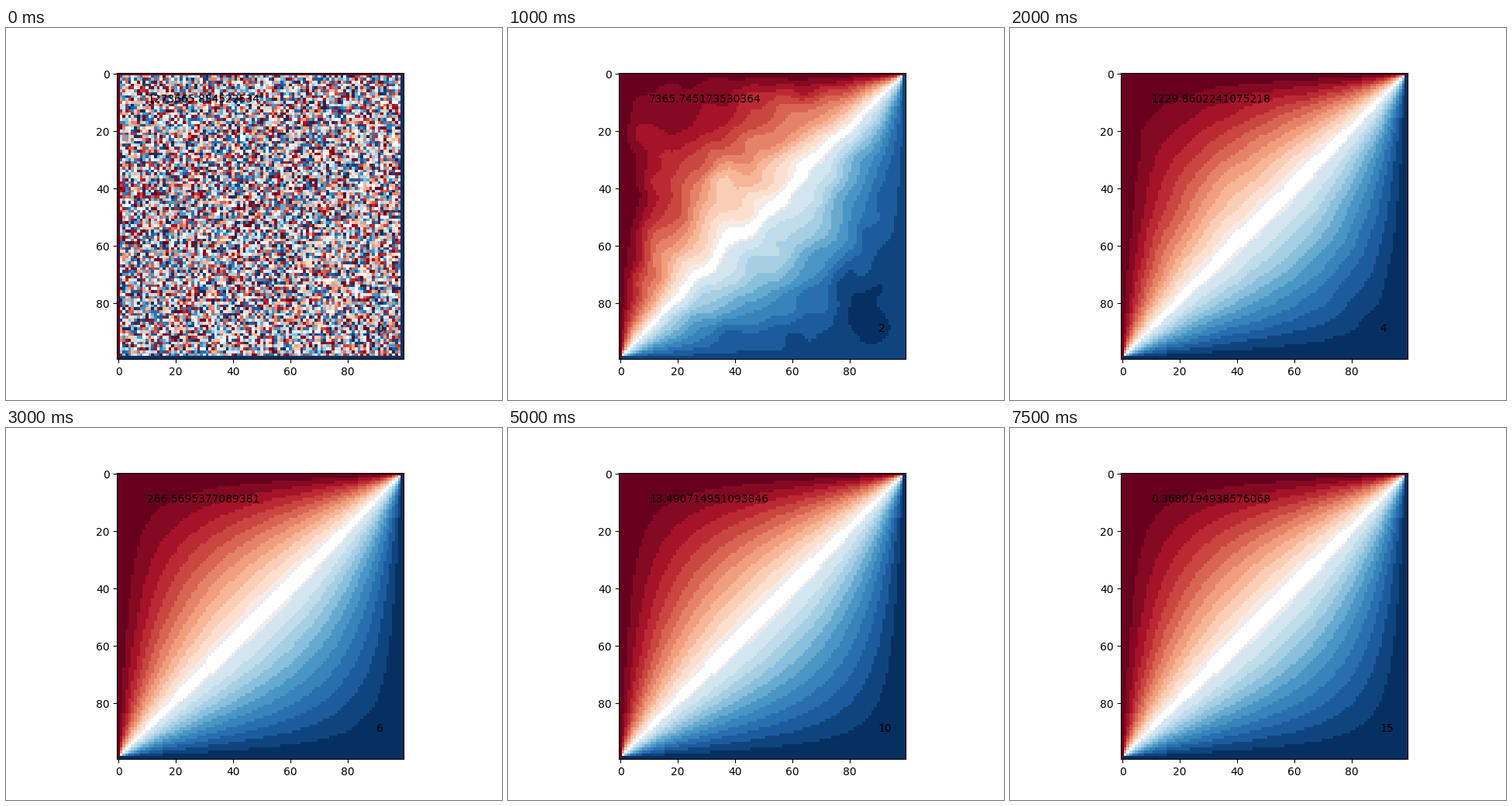
Animation, 640 px wide and 480 px high, one loop 8 s. Source, as a matplotlib script:

```python
import matplotlib
import matplotlib.pyplot as plt
import numpy as np
from matplotlib.animation import FuncAnimation
from matplotlib.colors import ListedColormap

N = 100          # grid points per side
FRAMES = 16
BUMP_DECAY = 0.13
NOISE_DECAY = 0.4

# Remaining error after some of the solver cycles; the rest decay evenly between.
ERRORS = {
    0: 1273665.834522534,
    1: 24759.016607611058,
    2: 7365.745173530364,
    4: 1229.8602241075218,
    8: 57.778369477655836,
    12: 3.1499571818490013,
    15: 0.3680194938576068,
}

rng = np.random.default_rng(4)
cell = np.arange(N)


def fix_edges(u):
    u[-1, :] = u[:, -1] = 1
    u[0, :] = u[:, 0] = 0
    return u


def laplace_solution():
    """Fourier series for 0 on the left and top, 1 on the right and bottom."""
    t = cell / (N - 1)
    k = np.arange(1, 200, 2)[:, None] * np.pi
    across = np.sinh(k * t) / np.sinh(k)
    along = 4 / k * np.sin(k * t)
    right = along.T @ across
    return fix_edges(right + right.T)


def smooth_noise(sigma):
    """White noise under a Gaussian blur, scaled to unit spread."""
    x = np.arange(-3 * sigma, 3 * sigma + 1)
    kernel = np.exp(-x**2 / (2 * sigma**2))
    field = rng.normal(size=(N + 6 * sigma, N + 6 * sigma))
    for _ in range(2):
        field = np.array([np.convolve(row, kernel, "valid") for row in field]).T
    return (field - field.mean()) / field.std()


def banded_cmap(levels=25):
    v = (np.arange(500) + 0.5) / 500
    rdbu = matplotlib.colormaps["RdBu"]
    colors = rdbu(np.floor(v * levels) / (levels - 1))
    off = v - 0.5
    colors[(off > 0) & (off < 0.1)] = rdbu(0.59)
    colors[abs(off) < 0.045, :3] = 0.945, 0.925, 0.925
    colors[abs(off) < 0.032, :3] = 1
    return ListedColormap(colors)


start = fix_edges(rng.uniform(0, 1, (N, N)))
solution = laplace_solution()

taper = (1 - np.exp(-cell / 3)) * (1 - np.exp(-((N - 1 - cell) / 7) ** 2))
edge = np.outer(taper, taper)
slope = np.add.outer(cell, cell) / (2 * N)
bump = 0.72 * slope**1.2 * edge
noise = (0.045 * smooth_noise(3) + 0.04 * smooth_noise(7)) * edge


def grid(n):
    if n == 0:
        return start
    return solution + bump * BUMP_DECAY ** (n - 1) + noise * NOISE_DECAY ** (n - 1)


def error_at(n):
    if n in ERRORS:
        return ERRORS[n]
    return float(np.exp(np.interp(n, list(ERRORS), np.log(list(ERRORS.values())))))


fig, ax = plt.subplots(figsize=(6.4, 4.8), dpi=100)
image = ax.imshow(start, cmap=banded_cmap(), interpolation="nearest")
error = ax.text(10, 10, "")
count = ax.text(90, 90, "")


def draw(n):
    image.set_data(grid(n))
    image.autoscale()
    error.set_text(str(error_at(n)))
    count.set_text(str(n))
    return image, error, count


anim = FuncAnimation(fig, draw, frames=FRAMES, interval=500, repeat=True, repeat_delay=0)
plt.show()
```
